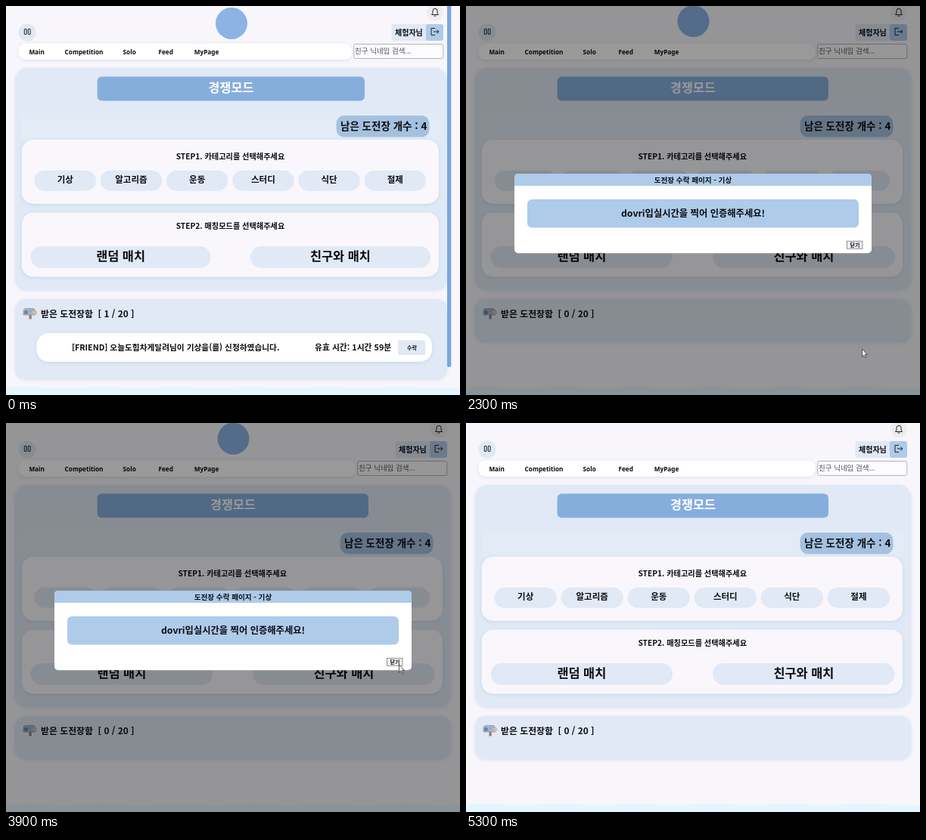
Write an HTML page that moves like this. It is 600 px wide and 515 px high and loops after 5400 ms.

```html
<!DOCTYPE html>
<html lang="ko">
<head>
<meta charset="utf-8">
<title>경쟁모드</title>
<style>
  html, body { margin: 0; width: 100%; height: 100%; overflow: hidden; background: #f8f6fb; }
  svg { display: block; width: 600px; height: 515px; }
  text { font-family: "Noto Sans CJK KR", "Noto Sans CJK", "Noto Sans", sans-serif; font-weight: 700; fill: #0c0c10; white-space: pre; }
  .nav { font-family: "Noto Sans", sans-serif; font-weight: 600; }
  .heavy { font-weight: 900; }
  .hint { font-weight: 400; fill: #555; }
  .light { fill: #fff; }
  .soft { filter: drop-shadow(0 1px 2px rgba(110, 150, 200, .22)); }
</style>
</head>
<body>
<svg id="stage" viewBox="0 0 600 515"></svg>
<script>
const LOOP = 5400, STEP = 100;
const PALE = '#e0e9f5', BLUE = '#86aedd', SKY = '#aecbea', CARD = '#f9f7fc', INK = '#222';
const stage = document.getElementById('stage');

function add(parent, tag, attrs = {}) {
  const el = document.createElementNS('http://www.w3.org/2000/svg', tag);
  for (const key in attrs) el.setAttribute(key, attrs[key]);
  parent.appendChild(el);
  return el;
}
const group = (parent = stage) => add(parent, 'g');
const box = (g, x, y, width, height, rx, fill, extra) =>
  add(g, 'rect', { x, y, width, height, rx, fill, ...extra });
const dot = (g, cx, cy, r, fill) => add(g, 'circle', { cx, cy, r, fill });
const line = (g, d, extra) =>
  add(g, 'path', { d, fill: 'none', stroke: INK, 'stroke-width': 1, 'stroke-linejoin': 'round', ...extra });
function label(g, str, x, y, size, extra) {
  const el = add(g, 'text', { x, y, 'font-size': size, ...extra });
  el.textContent = str;
  return el;
}
const centered = (g, str, x, y, size, extra) =>
  label(g, str, x, y, size, { 'text-anchor': 'middle', ...extra });
const SOFT = { class: 'soft' };
const HEAVY = { class: 'heavy' };

// d is the extra width gained when the scrollbar goes away
function drawHeader(g, d) {
  dot(g, 567 + d, 8.5, 11, '#edecef');
  line(g, `M${562.5 + d} 11.5h9l-1.4-2v-2.7a3.1 3.4 0 0 0-6.2 0v2.7zM${565.7 + d} 13.2h2.6`);

  dot(g, 28, 35, 11.5, PALE);
  for (const x of [24.3, 29.3]) box(g, x, 30.5, 2.8, 7, 0.4, 'none', { stroke: INK });

  box(g, 509.5 + d, 24, 68.5, 22, 3, PALE);
  box(g, 555 + d, 24, 23, 22, 3, SKY);
  label(g, '체험자님', 514 + d, 38.5, 10, HEAVY);
  line(g, `M${567 + d} 29.5h-5v9h5M${565 + d} 34h7m-2.4-2.5l2.4 2.5l-2.4 2.5`);

  box(g, 16.5, 49.5, 440.5 + d, 21.5, 9, '#fff', SOFT);
  const links = { Main: 30.4, Competition: 77.6, Solo: 154.6, Feed: 201.5, MyPage: 248.8 };
  for (const name in links) label(g, name, links[name], 63.5, 8.2, { class: 'nav' });
  box(g, 459.8 + d, 50.5, 118, 19, 2, '#fcfbfd', { stroke: '#b4b4ba' });
  label(g, '친구 닉네임 검색...', 461 + d, 63.2, 9.5, { class: 'hint' });
}

function drawModes(g, d) {
  const mid = 296.5 + d * 0.55;
  box(g, 12, 82, 571 + d, 294, 16, PALE, SOFT);
  box(g, 120.6, 93.5, 353.4 + d, 32, 6, BLUE);
  centered(g, '경쟁모드', 297.5 + d / 2, 114.2, 16.3, { class: 'heavy light' });

  box(g, 21, 142, 553 + d, 36, 2, '#e2ebf6');
  box(g, 436.5 + d, 145, 123, 28.5, 10, '#a5c1df');
  label(g, '남은 도전장 개수 : 4', 442 + d, 163.7, 13.5);

  box(g, 20.8, 177, 551.2 + d, 85, 15, CARD, SOFT);
  centered(g, 'STEP1. 카테고리를 선택해주세요', mid, 202.8, 10.2);
  const pitch = 87.2 + d * 0.17, wide = 81.5 + d * 0.16;
  ['기상', '알고리즘', '운동', '스터디', '식단', '절제'].forEach((name, i) => {
    const x = 37.5 + i * pitch;
    box(g, x, 217.8, wide, 27, 13.5, PALE);
    centered(g, name, x + wide / 2, 234.2, 11.5);
  });

  box(g, 20.8, 273.5, 551.2 + d, 85, 15, CARD, SOFT);
  centered(g, 'STEP2. 매칭모드를 선택해주세요', mid, 294.6, 10.2);
  const half = 237.8 + d / 2;
  [['랜덤 매치', 32.7], ['친구와 매치', 323 + d * 0.65]].forEach(([name, x]) => {
    box(g, x, 318, half, 28.7, 14.3, PALE);
    centered(g, name, x + half / 2, 337.3, 16.4);
  });
}

function drawInbox(g, d, count, height) {
  box(g, 12, 388, 571 + d, height, 14, PALE, SOFT);
  add(g, 'path', { d: 'M23 409v-5q0-3.5 3.5-3.5h9q3 0 3 3.5v5z', fill: '#a3b4c8', stroke: '#71849c', 'stroke-width': 0.6 });
  box(g, 24.2, 403, 4.6, 5, 2, '#6d819a');
  box(g, 30.5, 409, 3.2, 5.5, 0, '#9a7d68');
  box(g, 35.5, 403.5, 5.5, 4.5, 0.8, '#d9bd95');
  box(g, 31, 403, 3, 1.5, 0, '#83a9df');
  label(g, `받은 도전장함  [ ${count} / 20 ]`, 46, 411.5, 11.9);
}

function drawPage(d, count, height) {
  const g = group();
  drawHeader(g, d);
  drawModes(g, d);
  drawInbox(g, d, count, height);
  return g;
}

function drawRow(g) {
  box(g, 40.3, 433, 522.7, 38, 16, '#fff', SOFT);
  label(g, '[FRIEND] 오늘도힘차게달려님이 기상을(를) 신청하였습니다.', 87, 455.6, 10.7);
  label(g, '유효 시간: 1시간 59분', 408, 455.6, 10.8);
  const button = box(g, 518, 442.5, 36.3, 19.5, 2, PALE);
  const caption = centered(g, '수락', 536.4, 454.8, 7);
  return on => {
    button.setAttribute('fill', on ? BLUE : PALE);
    caption.classList.toggle('light', on);
  };
}

function drawModal() {
  const g = group();
  box(g, 0, 0, 600, 515, 0, '#000', { opacity: 0.4 });
  box(g, 64, 222, 472, 105.3, 5, '#fff');
  add(g, 'path', { d: 'M64 238v-11q0-5 5-5h462q5 0 5 5v11z', fill: SKY });
  centered(g, '도전장 수락 페이지 - 기상', 300, 233.6, 9.6, HEAVY);
  box(g, 81, 256, 438, 37.5, 6, SKY);
  centered(g, 'dovri입실시간을 찍어 인증해주세요!', 300, 279, 12.3);
  box(g, 503.5, 311.3, 20.5, 10, 0, '#f1f1f3', { stroke: '#777', 'stroke-width': 0.8 });
  centered(g, '닫기', 514, 319, 7);
  return g;
}

add(stage, 'path', { d: 'M0 505' + 'q25-2 50 0t50 0'.repeat(6) + 'V515H0z', fill: '#e3f6fd' });
const before = drawPage(0, 1, 106);
const setHover = drawRow(before);
box(before, 583, -8, 5.3, 486, 2.6, '#78a6dc');
const after = drawPage(5, 0, 57);
const logo = dot(stage, 298, 22, 21, '#8cb3e3');
const modal = drawModal();

const pointer = group();
const OUTLINE = { fill: '#fff', stroke: '#222', 'stroke-width': 0.75 };
const arrow = line(pointer, 'M0 0v10.2l2.3-2.1l1.5 3.6l1.6-.7l-1.5-3.5h3z', OUTLINE);
const hand = line(pointer,
  'M0 1q1.2-1.6 2.2 0v4.3q1-1 2 .1q1-.8 1.9.3q1.7-.4 1.7 1.2v3q0 1.5-1 2.5v1.6h-5.4v-1.4l-3.4-4.4q-.6-1.6.9-1.2l1.1 1.2z', OUTLINE);

// time, x, y of the pointer tip
const PATH = [
  [700, 590, 405], [1100, 524.5, 455], [2000, 523.5, 454], [2300, 523.5, 454], [2400, 519.5, 451],
  [2900, 486.5, 306.5], [3100, 486.5, 306.5], [3600, 519.5, 320], [4100, 519.5, 320],
  [4500, 261.7, 81], [4900, 102, 61], [5400, 102, 61]
];
const ease = k => k * k * (3 - 2 * k);
const clamp = k => Math.min(1, Math.max(0, k));

function pointerAt(t) {
  const i = Math.max(1, PATH.findIndex(p => p[0] >= t));
  const [t0, x0, y0] = PATH[i - 1], [t1, x1, y1] = PATH[i];
  const k = ease(clamp((t - t0) / (t1 - t0)));
  return [x0 + (x1 - x0) * k, y0 + (y1 - y0) * k];
}
const show = (el, on) => { el.style.display = on ? '' : 'none'; };

function render(t) {
  const accepted = t >= 2200, gone = t >= 5200;
  show(before, !accepted);
  show(after, accepted);
  setHover(t >= 1100);

  const dim = clamp((t - 2100) / 200) * clamp((4300 - t) / 200);
  modal.style.opacity = dim;
  show(modal, dim > 0);

  show(logo, !gone);
  logo.setAttribute('cx', accepted ? 300.5 : 298);
  logo.setAttribute('cy', 21.5 + 1.5 * Math.cos(t / 900 * 2 * Math.PI));

  const onLink = (t >= 1100 && t < 2000) || t >= 4900;
  show(pointer, t >= 700 && !gone);
  show(hand, onLink);
  show(arrow, !onLink);
  pointer.setAttribute('transform', `translate(${pointerAt(t)})`);
}

const start = performance.now();
function tick() {
  const t = (performance.now() - start) % LOOP;
  render(Math.floor(t / STEP) * STEP);
  requestAnimationFrame(tick);
}
tick();
</script>
</body>
</html>
```
